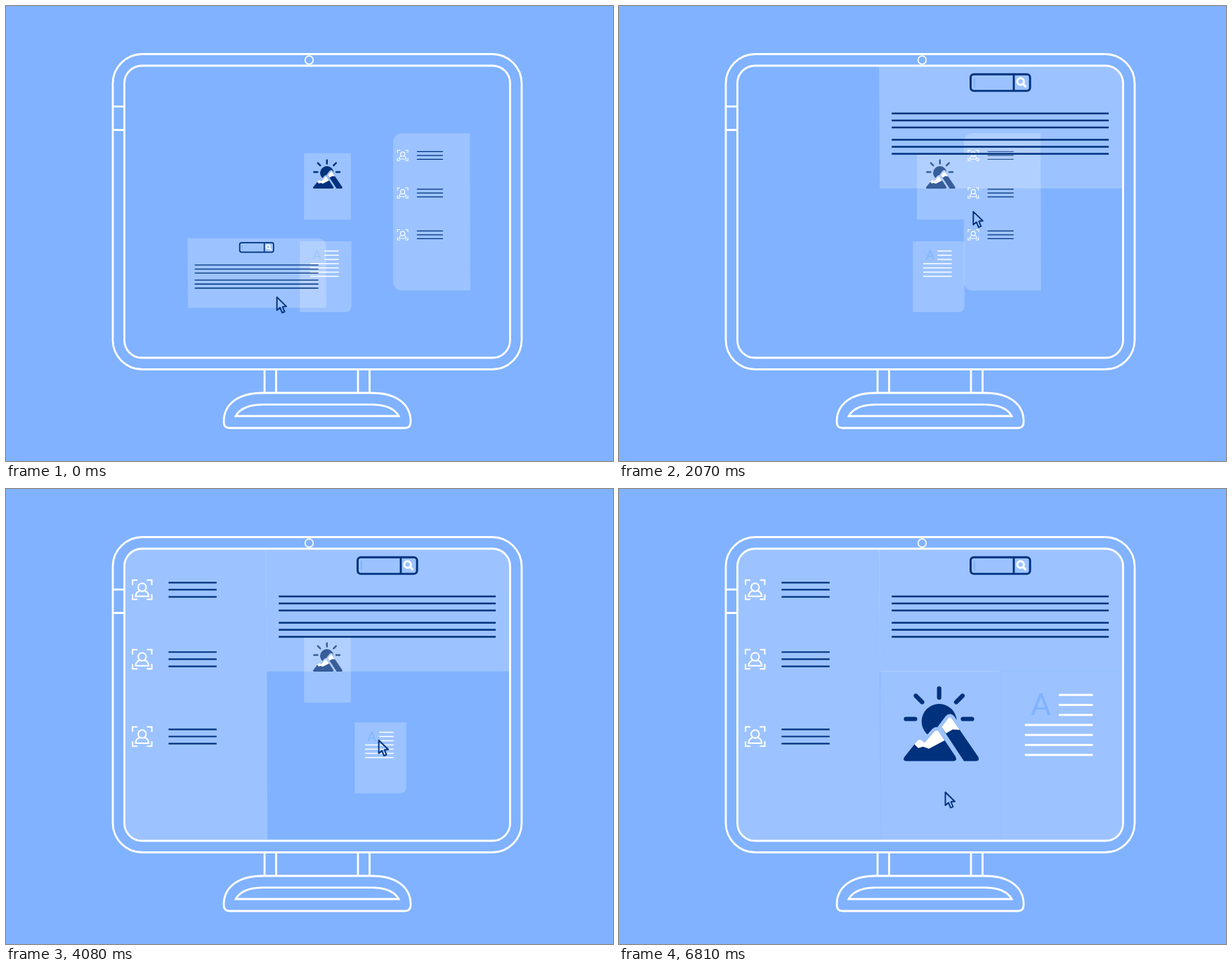
Recreate the animation shown at these times as an HTML page without scripts. Size 864 by 648 pixels, loop 7170 ms.

```html
<!DOCTYPE html>
<html lang="en">
<head>
<meta charset="utf-8">
<title>Arranging windows</title>
<style>
:root {
  --sky: #80b2ff;
  --navy: #00317d;
  --in: cubic-bezier(.33, 0, .67, .48);
  --out: cubic-bezier(.33, .45, .67, 1);
  --both: cubic-bezier(.33, 0, .67, 1);
}
html, body { margin: 0; width: 100%; height: 100%; overflow: hidden; background: var(--sky); }
svg { display: block; width: 864px; height: 648px; }

.pane { fill: #fff; fill-opacity: .22; }
.white, .navy { fill: none; stroke: #fff; }
.navy { stroke: var(--navy); }
.solid { fill: var(--navy); }
.snow { fill: #fff; }
.letter { font: 17.5px Lato, "Open Sans", sans-serif; fill: var(--sky); text-anchor: middle; }

.win, #pointer, #grid { animation: 7170ms linear infinite; }
#header { animation-name: header-move, header-grow; }
#people { animation-name: people-move, people-grow; }
#article { animation-name: article-move, article-grow; }
#photo { animation-name: photo-move, photo-grow; }
#pointer { animation-name: pointer; }
#grid { animation-name: grid; }

@keyframes header-move {
  0% { translate: 357px 380.5px; }
  10.88% { translate: 468.5px 256.7px; animation-timing-function: var(--out); }
  19.53%, 100% { translate: 543.5px 173px; }
}
@keyframes header-grow {
  0%, 11.1% { scale: 1; animation-timing-function: var(--both); }
  19.53%, 100% { scale: 1.755; }
}
@keyframes people-move {
  0%, 23.01% { translate: 606px 293.2px; animation-timing-function: var(--in); }
  28.87% { translate: 546px 293.2px; }
  41% { translate: 350.5px 293px; animation-timing-function: var(--out); }
  48.12%, 100% { translate: 270.4px 292px; }
}
@keyframes people-grow {
  0%, 34.87% { scale: 1; }
  41% { scale: 1.464; animation-timing-function: var(--out); }
  48.12%, 100% { scale: 1.85; }
}
@keyframes article-move {
  0%, 50.21% { translate: 455px 385.5px; animation-timing-function: var(--in); }
  56.9% { translate: 533px 383px; animation-timing-function: var(--out); }
  65.55%, 100% { translate: 630px 380px; }
}
@keyframes article-grow {
  0%, 57.88% { scale: 1; animation-timing-function: var(--both); }
  65.55%, 100% { scale: 2.375; }
}
@keyframes photo-move {
  0%, 70.01% { translate: 457.5px 257px; animation-timing-function: var(--both); }
  90.38%, 100% { translate: 457.5px 380px; }
}
@keyframes photo-grow {
  0%, 80.89% { scale: 1; animation-timing-function: var(--both); }
  90.38%, 100% { scale: 2.56; }
}
@keyframes pointer {
  0% { translate: 385px 414px; }
  10.88% { translate: 485px 277px; animation-timing-function: var(--out); }
  19.53% { translate: 546px 194px; animation-timing-function: var(--both); }
  23.01% { translate: 547px 287px; animation-timing-function: var(--in); }
  28.87% { translate: 504px 292px; }
  41% { translate: 363px 307px; animation-timing-function: var(--out); }
  48.12% { translate: 306px 313px; animation-timing-function: var(--both); }
  50.21% { translate: 452px 359px; animation-timing-function: var(--in); }
  56.9% { translate: 530px 357px; animation-timing-function: var(--out); }
  65.55% { translate: 627px 354px; animation-timing-function: var(--both); }
  70.01% { translate: 464px 287px; animation-timing-function: var(--both); }
  90.38%, 100% { translate: 464px 431px; }
}
@keyframes grid {
  0%, 11.3% { opacity: 0; }
  13%, 21.1% { opacity: 1; }
  23.2%, 34.87% { opacity: 0; }
  36.5%, 49.37% { opacity: 1; }
  51.46%, 57.88% { opacity: 0; }
  59.5%, 67.78% { opacity: 1; }
  69.87%, 80.89% { opacity: 0; }
  82.5%, 92.89% { opacity: 1; }
  94.9%, 100% { opacity: 0; }
}
</style>
</head>
<body>
<svg viewBox="0 0 864 648">
  <defs>
    <g id="person">
      <g class="white" stroke-width="1.1">
        <path d="M-7.4-3.6V-7.4H-3.6M3.6-7.4H7.4V-3.6M7.4 3.6V7.4H3.6M-3.6 7.4H-7.4V3.6"/>
        <circle cy="-1.9" r="3.1"/>
        <path d="M-1.8.8C-3.6 1.3-5 2.6-5 5.1H5C5 2.6 3.6 1.3 1.8.8"/>
      </g>
      <path class="navy" stroke-width="1.2" d="M20.3-5.5h37M20.3 0h37M20.3 5.5h37"/>
    </g>
    <path id="left-hill" d="M409 387.500Q403 387 406 382L425 358Q428 355 431 358L435 361 449 345Q452 342 455 345L479 381Q482 387 476 387.500Z"/>
    <path id="right-hill" d="M459 339L468 327Q471 323 474 327L511 381Q514 387 508 387.500H491Z"/>
    <mask id="behind-hills" maskUnits="userSpaceOnUse" x="400" y="275" width="120" height="120">
      <path fill="#fff" d="M400 275h120v120H400z"/>
      <g stroke="#000" stroke-width="9">
        <use href="#left-hill"/>
        <use href="#right-hill"/>
      </g>
    </mask>
  </defs>

  <g id="photo" class="win">
    <path class="pane" d="M-33.300-47.300H33.300V47.300H-33.300Z"/>
    <g transform="scale(.3906) translate(-457.500 -380)">
      <path class="navy" stroke-width="6.200" stroke-linecap="round" d="M455.700 284v13M422.500 294.500l9 9M489 294.500l-9 9M408.500 327.500h13M489.500 327.500h13"/>
      <circle class="solid" cx="455.700" cy="331" r="25" mask="url(#behind-hills)"/>
      <use class="solid" href="#left-hill"/>
      <use class="solid" href="#right-hill"/>
      <path class="snow" d="M420.500 363.500L425 358Q428 355 431 358L435 361 449 345Q452 342 455 345L463.500 358 441 370 433 367 426 369Z"/>
      <path class="snow" d="M459 339L468 327Q471 323 474 327L485 343 475 342.500 465.500 348Z"/>
    </g>
  </g>

  <g id="article" class="win">
    <path class="pane" d="M-36.700-50.500H36.700V41.500Q36.700 50.500 27.700 50.500H-36.700Z"/>
    <text class="letter" x="-12.400" y="-24.300">A</text>
    <path class="white" stroke-width="1.300" d="M-1.700-36.500H18.700M-1.700-30.500H18.700M-1.700-24.500H18.700M-22-18.500H18.700M-22-12.500H18.700M-22-6.500H18.700M-22-.5H18.700"/>
  </g>

  <g id="people" class="win">
    <path class="pane" d="M-41-112H54.300L55 112H-41Q-55 112-55 98V-98Q-55-112-41-112Z"/>
    <use href="#person" x="-41.400" y="-80.300"/>
    <use href="#person" x="-41.400" y="-26.800"/>
    <use href="#person" x="-41.400" y="32.700"/>
  </g>

  <g id="header" class="win">
    <path class="pane" d="M-98.800-49.500H85Q98.700-49.500 98.700-36V49.500H-98.200Z"/>
    <path class="navy" stroke-width="1.350" d="M-88.500-11.400h176M-88.500-5.700h176M-88.500 0h176M-88.500 10h176M-88.500 15.700h176M-88.500 21.400h176"/>
    <rect class="navy" stroke-width="1.700" x="-24.500" y="-43.200" width="48.200" height="13.500" rx="2.600"/>
    <path class="navy" stroke-width="1.600" d="M10.500-43.200v13.500"/>
    <path stroke="#80b2ff" stroke-width="1.100" d="M-21.400-40.200v7.600"/>
    <circle class="white" stroke-width="1.700" cx="16" cy="-37.300" r="2.700"/>
    <path class="white" stroke-width="1.900" stroke-linecap="round" d="M18.200-35.100l1.700 1.700"/>
  </g>

  <path id="grid" class="navy" stroke-width="1.400" d="M370 86L371.300 499M370 259L716 259.600M543 260L543.800 499"/>

  <g class="white" stroke-width="2.800">
    <rect x="152" y="68.500" width="582" height="449" rx="42"/>
    <rect x="168.500" y="85" width="549" height="416" rx="25"/>
    <circle cx="431.500" cy="77" r="5.800" stroke-width="1.700"/>
    <path d="M152 143.200h16.500M152 176.500h16.500M368 517.500V551M384.500 517.500V551M501 517.500V551M517.500 517.500V551"/>
    <path d="M318 601Q310 601 310 592C310 567 330 551 366 551H520C556 551 576 567 576 592Q576 601 568 601Z"/>
    <path d="M327 584H559C553 573 541 567.700 520 567.700H366C345 567.700 333 573 327 584Z"/>
  </g>

  <path id="pointer" class="navy" stroke-width="1.900" stroke-linejoin="round" d="M.5.800V19.500L5 15.700 8 23 11.500 21.500 8.500 14.500 14 14Z"/>
</svg>
</body>
</html>
```
